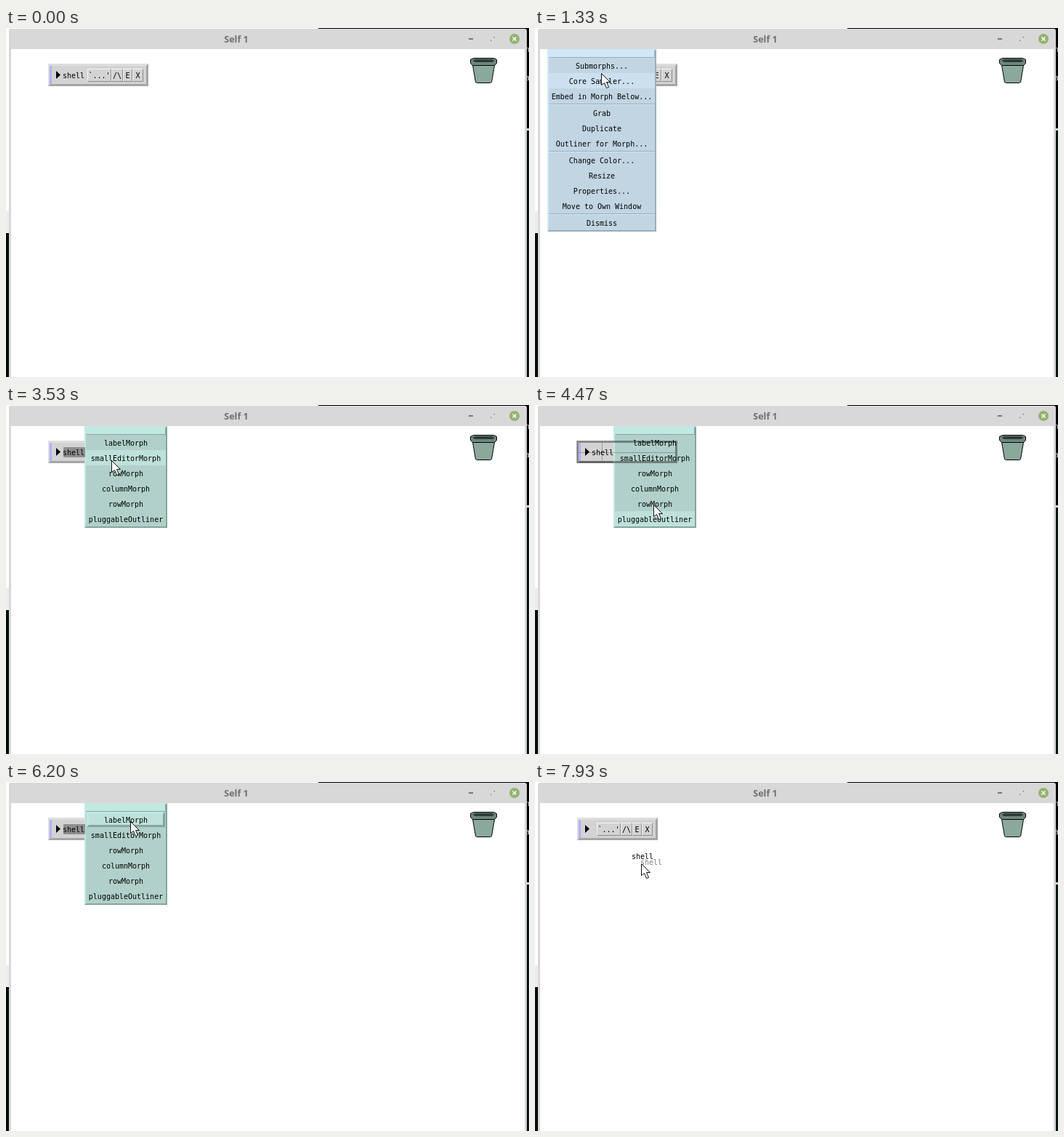
Write an HTML page with a canvas that moves like this. It is 720 px wide and 480 px high and loops after 8 s.

```html
<!DOCTYPE html>
<html lang="en">
<head>
<meta charset="utf-8">
<title>Self 1</title>
<style>
html, body { margin: 0; width: 720px; height: 480px; overflow: hidden; background: #fff; }
canvas { display: block; }
</style>
</head>
<body>
<canvas id="stage" width="720" height="480"></canvas>
<script>
const c = document.getElementById('stage').getContext('2d');
const LOOP = 8000, STEP = 200 / 3, LAG = 2 * STEP, ROW = 21, TOP = 41;
const GRAB = 7466;
const MONO = '10px "DejaVu Sans Mono", monospace';

const gray = { face: '#d3d3d3', light: '#dedede', dark: '#a5a5a5' };
const button = { face: '#d3d3d3', light: '#f4f4f4', dark: '#8c8c8c' };
const blue = { face: '#c1d5e3', light: '#d0e8f6', dark: '#98aebd', hover: '#cce1ef' };
const green = { face: '#b1d0ca', light: '#c2e9e1', dark: '#85a59e', hover: '#bee1da' };

// '-' marks a separator
const menus = [
  { mid: 92, skin: blue, from: 1333, press: 2333, to: 2400, items: ['Submorphs...',
    'Core Sampler...', 'Embed in Morph Below...', '-', 'Grab', 'Duplicate',
    'Outliner for Morph...', '-', 'Change Color...', 'Resize', 'Properties...',
    'Move to Own Window', '-', 'Dismiss'] },
  { mid: 165, skin: green, from: 2800, press: 6200, to: 6266, marks: true, items: ['labelMorph',
    'smallEditorMorph', 'rowMorph', 'columnMorph', 'rowMorph', 'pluggableOutliner'] },
  { mid: 172, skin: blue, from: 6466, press: 7400, to: GRAB, items: ['Core Sampler...', '-',
    'Grab', 'Duplicate', '-', 'Change Color...', 'Resize', 'Properties...', '-', 'Dismiss'] }
];

// the pointer rests between moves
const moves = [
  { from: 333, to: 867, x: 91, y: 62 },
  { from: 1867, to: 2067, x: 96, y: 53 },
  { from: 2400, to: 2733, x: 164, y: 60 },
  { from: 2933, to: 3533, x: 145, y: 76 },
  { from: 3533, to: 4267, x: 161, y: 160 },
  { from: 4267, to: 5200, x: 171, y: 54 },
  { from: 7133, to: 7333, x: 171, y: 75 },
  { from: GRAB, to: 7933, x: 146, y: 112 }
];

function pointerAt(t) {
  let x = 126, y = 2;
  for (const m of moves) {
    const f = Math.min(1, Math.max(0, (t - m.from) / (m.to - m.from)));
    x += (m.x - x) * f;
    y += (m.y - y) * f;
  }
  return [Math.round(x), Math.round(y)];
}

function rect(color, x, y, w, h) {
  c.fillStyle = color;
  c.fillRect(x, y, w, h);
}

function text(s, x, y, color = '#000', align = 'left', font = MONO) {
  c.font = font;
  c.textAlign = align;
  c.fillStyle = color;
  c.fillText(s, x, y);
}

function shape(points, fill, stroke) {
  c.beginPath();
  points.forEach(([x, y]) => c.lineTo(x, y));
  c.closePath();
  c.fillStyle = fill;
  c.fill();
  if (!stroke) return;
  c.strokeStyle = stroke;
  c.lineWidth = 1;
  c.stroke();
}

function bevel(x, y, w, h, d, { face, light, dark }) {
  rect(dark, x, y, w, h);
  shape([[x, y], [x + w, y], [x + w - d, y + d], [x + d, y + h - d], [x, y + h]], light);
  rect(face, x + d, y + d, w - 2 * d, h - 2 * d);
}

function drawDesktop() {
  rect('#fff', 0, 0, 720, 480);
  rect('#000', 430, 0, 290, 2);
  rect('#000', 714, 0, 6, 138);
  rect('#ededed', 0, 252, 5, 29);
  rect('#030b0d', 0, 282, 5, 198);
  text('n', 715, 33, '#ddd');
  text('a', 715, 72, '#ddd');
  rect('#d8d8d0', 714, 138, 6, 3);
  rect('#071719', 714, 141, 6, 339);
}

function drawWindow() {
  c.fillStyle = '#d8d8d8';
  c.beginPath();
  c.roundRect(4, 1, 713, 485, 3);
  c.fill();
  rect('#fff', 7, 29, 707, 451);
  text('Self 1', 317, 20, '#707070', 'center', 'bold 12.5px "Noto Sans", "Open Sans", sans-serif');
  rect('#777', 637, 14, 6, 2);
  for (const s of [-1, 1]) {
    shape([[670 + s, 15 - 3 * s], [670 + 3 * s, 15 - 3 * s], [670 + 3 * s, 15 - s]], '#777');
  }
  c.fillStyle = '#91b36f';
  c.beginPath();
  c.arc(700, 15, 7, 0, 7);
  c.fill();
  c.strokeStyle = '#fff';
  c.lineWidth = 1.5;
  c.beginPath();
  for (const s of [-2.5, 2.5]) {
    c.moveTo(700 - s, 12.5);
    c.lineTo(700 + s, 17.5);
  }
  c.stroke();
}

// a shape mirrored about the middle of the trash can
function canPart(half, fill, stroke) {
  const side = s => half.map(([dx, y]) => [657.5 + s * dx, y]);
  shape([...side(1), ...side(-1).reverse()], fill, stroke);
}

function drawTrash() {
  canPart([[15, 51.5], [11, 74.5], [9, 75.5]], '#8ba99b', '#000');
  canPart([[14, 41.5], [18, 43.5], [18, 48.5], [15, 51.5]], '#6f877c', '#000');
  canPart([[12, 43], [15, 45], [12, 47]], '#2f3b36');
}

function drawOutliner(grabbed) {
  const dx = grabbed ? -27 : 0;
  bevel(58, 49, 138 + dx, 31, 3, gray);
  rect('#b0b0fa', 60, 52, 3, 25);
  shape([[69, 59], [75, 64.5], [69, 70]], '#000');
  if (!grabbed) text('shell', 78, 69);
  let x = 112 + dx;
  for (const [s, w] of [["`...'", 33], ['/\\', 16], ['E', 13], ['X', 15]]) {
    bevel(x, 56, w, 18, 1, button);
    text(s, x + w / 2, 69, '#000', 'center');
    x += w;
  }
}

// draws a menu and returns the index of the row under hoverY
function drawMenu({ mid, skin, items }, hoverY, pressed) {
  const { light, dark, hover } = skin;
  const w = 6 * Math.max(...items.map(s => s.length)) + 12, x = mid - w / 2;
  const bottom = items.reduce((y, s) => y + (s === '-' ? 2 : ROW), TOP + 2);
  let y = TOP, active = -1;
  bevel(x, 29, w, bottom - 29, 2, skin);
  bevel(x + 2, 30, w - 4, 11, 1, { face: light, light, dark });
  items.forEach((s, i) => {
    if (s === '-') {
      rect(dark, x + 2, y, w - 4, 1);
      rect(light, x + 2, y + 1, w - 4, 1);
      y += 2;
      return;
    }
    if (hoverY >= y && hoverY < y + ROW) {
      active = i;
      if (pressed) bevel(x + 3, y, w - 6, ROW, 3, { ...skin, face: hover });
      else rect(hover, x + 2, y, w - 4, ROW);
    }
    text(s, mid, y + 15, '#000', 'center');
    y += ROW;
  });
  return active;
}

// outlines the part of the outliner that a row stands for
function markPart(index) {
  if (index < 0) return;
  if (index < 2) {
    rect('rgba(0,0,0,.33)', 79, 58, 30, 14);
    return;
  }
  const depth = 5 - index;
  const x = 57 + 3 * depth, y = 49 + 2 * depth, w = 139 - 5 * depth, h = 31 - 3 * depth;
  c.strokeStyle = 'rgba(0,0,0,.38)';
  c.lineWidth = 3;
  c.strokeRect(x + 1.5, y + 1.5, w - 3, h - 3);
  rect('rgba(0,0,0,.25)', 92, y + 3, 1, h - 6);
  rect('rgba(0,0,0,.25)', x + 3, 65, w - 6, 1);
}

function drawPointer(x, y) {
  c.save();
  c.translate(x + .5, y + .5);
  shape([[0, 0], [0, 16], [4, 13], [7, 20], [10, 19], [7, 12], [12, 12]], '#fff', '#111');
  c.restore();
}

function draw(t) {
  const [x, y] = pointerAt(t), grabbed = t >= GRAB;
  drawDesktop();
  drawWindow();
  drawTrash();
  drawOutliner(grabbed);
  for (const menu of menus) {
    if (t < menu.from || t >= menu.to) continue;
    const active = drawMenu(menu, pointerAt(t - LAG)[1], t >= menu.press);
    if (menu.marks) markPart(active);
  }
  if (grabbed) {
    text('shell', x - 1, y + 2, 'rgba(0,0,0,.5)');
    text('shell', x - 13, y - 6);
  }
  if (t >= 333) drawPointer(x, y);
}

function tick() {
  const t = performance.now() % LOOP;
  // the picture advances fifteen times a second
  draw(Math.floor((t + 5) / STEP) * STEP);
  requestAnimationFrame(tick);
}
tick();
</script>
</body>
</html>
```
